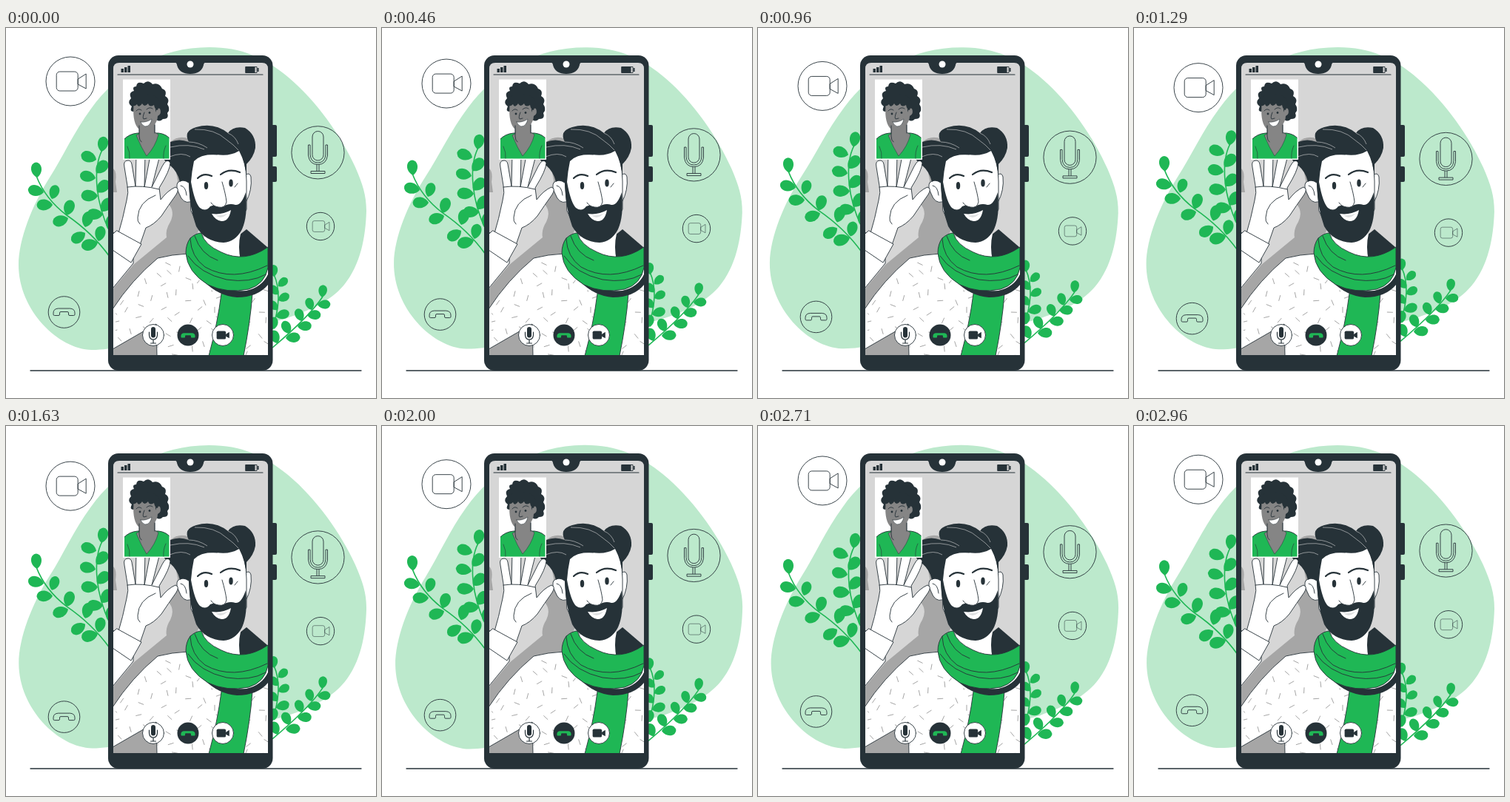
An HTML page that plays this animation: 500x500 px, repeating every 3 s.

```html
<!DOCTYPE html>
<html lang="en">
<head>
<meta charset="utf-8">
<title>Video call</title>
<style>
html, body { margin: 0; height: 100%; overflow: hidden; background: #fff; }
svg { display: block; width: 100vw; height: 100vh; }
.d { fill: #263238; }
.g { fill: #1fb755; }
.w { fill: #fff; }
.s { fill: #a6a6a6; }
.n { fill: none; }
.l { stroke: #263238; stroke-width: .9; stroke-linejoin: round; stroke-linecap: round; }
.icon * { fill: none; stroke: #263238; stroke-width: .9; vector-effect: non-scaling-stroke; }
.stem { fill: none; stroke: #1fb755; stroke-width: 1.6; }
</style>
</head>
<body>
<svg viewBox="0 0 500 500">
<defs>
  <path id="leaf" d="M0 0C-7-4-9-13-5-18Q0-23 5-18C9-13 7-4 0 0Z"/>
  <g id="cam"><rect x="-19" y="-13" width="29" height="26" rx="4.5"/><path d="M10-3 21-10V10L10 4Z"/></g>
  <path id="handset" d="M-14.5 1Q-14.5-4.5-8-5H8Q14.5-4.5 14.5 1V3Q14.5 4.5 13 4.5H7.5Q6 4.5 6 3V1Q6-.5 4.5-.5H-4.5Q-6-.5-6 1V3Q-6 4.5-7.5 4.5H-13Q-14.5 4.5-14.5 3Z"/>
  <clipPath id="screen"><path d="M153 47H346Q354 47 354 55V442H145V55Q145 47 153 47Z"/></clipPath>
  <clipPath id="shirt"><path d="M148 378Q172 342 207 314L246 308Q250 342 292 362L274 442H205L203 397 148 428ZM333 364 354 348V442H321Z"/></clipPath>
  <clipPath id="inset"><path d="M160 71H220.500V176.500H160Z"/></clipPath>
</defs>

<path id="blob" fill="#bce9cc" d="M275 26C318 26 350 40 382 67C420 99 453 146 472 188C482 211 487 226 487 247C486 283 479 320 457 347C437 371 408 382 380 392C310 414 245 385 200 410C168 427 146 435 116 435C70 434 17 381 17 320C17 286 35 240 59 202C77 174 92 140 115 109C151 59 207 26 275 26Z"/>

<g id="plants">
  <path class="stem" d="M41 200Q53 231 82 253Q117 277 140 309M130 165C117 190 121 236 140 275M428 363Q410 390 360 432M362 333Q375 362 360 407"/>
</g>

<path class="l" style="stroke-width:1.300" d="M33 463H480"/>
<rect class="d" x="355" y="131" width="11" height="43" rx="2"/>
<rect class="d" x="355" y="187" width="11" height="21" rx="2"/>
<rect class="d" x="138" y="37" width="222.500" height="426" rx="14"/>

<g clip-path="url(#screen)">
  <path fill="#d6d6d6" d="M145 47H354V442H145Z"/>
  <path class="s" d="M222 154Q234 144 248 150L262 270 246 304 205 311 145 380V352L172 320 217 283Q215 273 222 262 229 248 219 237 232 222 232 206ZM145 190Q150 194 148 208L150 222H145ZM145 442V430L204 398V442Z"/>

  <path class="w l" d="M144 380Q170 340 205 311Q224 306 246 305L355 297V443H204L203 400 144 434Z"/>
  <g clip-path="url(#shirt)"><path id="dashes" class="n" stroke="#9a9a9a" stroke-width=".9"/></g>

  <path class="d" d="M310 284 325 272 353 296 346 309 316 314Z"/>
  <path class="w" d="M267 282Q271 297 283 302L317 314Q313 295 317 278Z"/>
  <path class="g l" d="M291 359Q286 399 274 443H321Q330 399 333 359Z"/>
  <path class="d" d="M268 343Q290 357 325 355Q346 350 354 333V347Q340 364 312 364Q287 362 268 343Z"/>
  <path class="g l" d="M249 284Q257 277 264 277Q268 293 291 303Q322 318 354 296V324Q350 346 328 353Q298 359 273 347Q245 330 243 304Q243 292 249 284Z"/>
  <path class="n l" d="M249 285Q250 309 269 323Q306 344 353 321M255 281Q263 306 286 314M246 308Q262 332 298 340Q330 345 351 333"/>

  <path class="w l" d="M247 209Q238 203 232 209Q229 214 234 224Q239 238 249 235ZM323 199Q329 194 331 201Q333 219 324 236Z"/>
  <path class="n l" d="M236 213Q243 214 244 226"/>
  <path class="w l" d="M249 180Q259 168 285 171L314 162Q325 179 325 207V245L309 274H263L250 247Z"/>
  <path class="d" d="M222 154Q234 149 247 154Q239 139 257 134Q281 127 300 142Q307 132 323 135Q338 144 337 162Q335 174 325 184L325 203Q324 183 315 166Q302 174 284 171Q263 170 254 180Q251 194 250 208Q255 236 262 243Q270 249 276 241Q285 237 292 242Q301 236 310 239Q318 240 324 222Q327 254 319 272Q310 289 294 290Q269 289 257 268Q248 244 247 209Q240 204 235 208Q232 194 221 185Q213 179 212 174Q218 166 222 154Z"/>
  <path class="n" stroke="#d6d6d6" stroke-width=".6" d="M222 161Q247 155 268 164M247 154Q260 154 272 162M255 137Q282 136 298 151 308 158 314 165M300 142Q310 146 314 157M221 174Q238 167 249 174"/>
  <path class="w l" d="M292 208Q297 225 298 235Q296 244 287 242Q280 241 277 236L279 230Z" stroke="none" style="stroke:none"/>
  <path class="n l" d="M292 208Q297 225 298 235Q296 244 287 242Q280 241 277 236"/>
  <path class="w" d="M278 251Q292 253 304 246Q301 262 291 261Q283 260 278 251Z"/>
  <path class="d" d="M283 253Q293 254 300 250Q291 260 283 253Z" opacity=".15"/>
  <ellipse class="d" cx="270.500" cy="213" rx="2.700" ry="5"/>
  <ellipse class="d" cx="304" cy="209.500" rx="2.700" ry="5"/>
  <path class="n l" style="stroke-width:2.200" d="M259 203Q267 195 278 200M290 198Q301 189 316 195"/>
  <path class="n l" d="M309 215 313 210"/>

  <path class="w l" d="M144 275 172 310V318L144 352Z"/>
  <path class="w l" d="M151 281Q158 258 163 233Q166 222 164 213L160 188Q158 179 165 179Q169 179 170 184L175 214 176 170H188L187 215 195 172H208L197 215 211 187Q217 175 222 182Q222 192 207 216L209 232Q219 219 229 215Q235 217 230 225Q220 239 210 254Q200 266 189 270L180 296Z"/>
  <path class="n l" d="M164 215Q184 212 207 218M202 226Q179 235 178 256Q177 261 181 265"/>
  <path class="w l" d="M150 274 183 292 169 317 144 300V279Z"/>

  <path class="w" d="M158 69.500H222V178H158Z"/>
  <g clip-path="url(#inset)">
    <path class="g l" d="M159 151Q166 143 178 142H206Q216 143 222 150V178H159Z"/>
    <path class="d" d="M176 79Q177 71 186 75Q192 69 198 76Q207 73 211 82Q218 84 215 92Q222 96 218 103Q223 110 218 115Q221 123 212 123Q206 129 201 121L174 113Q166 114 170 106Q163 101 169 95Q165 87 173 85Q170 79 176 79Z"/>
    <path fill="#858585" class="l" style="stroke-width:.5" d="M180 131V143L176 145Q183 162 190 173Q202 160 206 144L201 141V124Z"/>
    <path fill="#858585" d="M173 100Q170 125 178 135Q188 144 197 135Q205 127 205 119Q211 116 208 109Q204 107 202 114L202 96Z"/>
    <path class="d" d="M169 99Q173 88 187 91Q201 86 208 100L205 111Q201 110 200 104Q194 108 192 102Q187 108 184 102Q179 109 177 103Q171 109 169 99Z"/>
    <path class="n l" d="M176 112Q179 108 183 111M190 110Q194 106 198 109M187 114Q184 121 186 123L190 122M180 132V146Q180 152 183 154M201 131V142"/>
    <circle class="d" cx="181" cy="116" r="1.400"/><circle class="d" cx="194" cy="114.500" r="1.400"/>
    <path class="w l" style="stroke-width:.5" d="M182 127Q190 128 197 123Q195 133 188 133Q184 132 182 127Z"/>
    <path class="n l" style="stroke-width:.6" d="M167 177Q168 168 164 160M213 177Q212 167 216 159"/>
  </g>

  <circle class="w l" cx="199" cy="415" r="14.500"/>
  <rect class="d" x="196" y="404" width="6" height="14.500" rx="3"/>
  <path class="n l" style="stroke-width:1.200" d="M193.500 411V415Q194 421 199 421Q204 421 204.500 415V411M199 421V426M195.500 426H202.500"/>
  <circle class="d" cx="246" cy="415" r="14.500"/>
  <use href="#handset" class="g" transform="translate(246 415.500) scale(.66)"/>
  <circle class="w l" cx="293" cy="415" r="14.500"/>
  <use href="#cam" class="d" transform="translate(292.800 415) scale(.43)"/>
</g>

<path class="n l" style="stroke-width:1.100" d="M151 63H347"/>
<path class="d" d="M225 46Q231 46 231 50Q234 62 249 62Q264 62 267 50Q267 46 273 46Z"/>
<circle class="w" cx="249" cy="49" r="4.500"/>
<path class="d" d="M155.500 55H159V60H155.500ZM160 53H163.500V60H160ZM164.500 51H168V60H164.500ZM339.500 54H341.500V59H339.500Z"/>
<rect class="n l" x="324" y="52.500" width="15" height="8"/>
<path class="d" d="M324 52H336.500V61H324Z"/>

<g id="icons" class="icon">
  <circle cx="87" cy="72" r="33"/>
  <use href="#cam" transform="translate(87.200 72)"/>
  <circle cx="425" cy="268" r="18.700"/>
  <use href="#cam" transform="translate(425 268) scale(.57)"/>
  <circle cx="78.500" cy="384" r="21.300"/>
  <use href="#handset" transform="translate(78.500 384)"/>
  <circle cx="421.500" cy="168.300" r="35.600"/>
  <rect x="414" y="139.500" width="15" height="39.500" rx="7.500"/>
  <path d="M408.500 158H411V171Q412 182 421.500 182Q431 182 432 171V158H434.500V172Q433 184.500 421.500 184.500Q410 184.500 408.500 172ZM420 184.500V193.500M423 184.500V193.500M412 193.500H431V196.500H412Z"/>
</g>
</svg>
<script>
const el = id => document.getElementById(id);

// x, y of the stalk, angle, size
const leftLeaves = [
  [42, 202, -5, 1], [51, 222, -78, 1.05], [62, 231, 18, .95], [63, 239, -90, 1.05],
  [82, 253, 17, 1.03], [84, 257, -108, 1.05], [107, 269, 16, 1.05], [107, 277, -122, 1.05],
  [125, 288, 12, 1], [124, 290, -104, 1.1],
  [129, 167, 10, 1], [122, 178, -70, 1.05], [122, 196, 42, 1.05], [121, 203, -77, 1.05],
  [123, 222, 46, 1.05], [124, 227, -88, 1.1], [129, 248, 37, 1.05], [131, 252, -88, 1.05],
  [138, 272, 20, 1]
];
const rightLeaves = [
  [427, 364, 7, .82], [421, 374, 87, .85], [413, 381, -17, .82], [407, 388, 88, .9],
  [400, 396, -22, .86], [394, 403, 88, .92], [383, 413, -25, .9], [378, 419, 86, .95],
  [367, 426, -22, .9],
  [362, 336, -2, .78], [368, 349, 48, .78], [368, 360, -43, .75], [368, 368, 62, .8],
  [367, 381, -42, .75], [365, 390, 72, .9], [362, 407, 0, .8]
];
el("plants").innerHTML += [...leftLeaves, ...rightLeaves].map(([x, y, a, s]) =>
  `<use href="#leaf" class="g" transform="translate(${x} ${y}) rotate(${a}) scale(${s})"/>`).join("");

// Scattered strokes of the shirt fabric
let marks = "";
for (let row = 0; row < 9; row++) {
  for (let col = 0; col < 10; col++) {
    const n = row * 10 + col;
    const x = 146 + col * 22 + row % 2 * 11 + 4 * Math.sin(n * 7);
    const y = 320 + row * 15 + 4 * Math.cos(n * 5);
    const a = n * 2.2 + Math.sin(n);
    marks += `M${x} ${y}l${8 * Math.cos(a)} ${8 * Math.sin(a)}`;
  }
}
el("dashes").setAttribute("d", marks);

const move = (id, transform) => el(id).setAttribute("transform", transform);

function draw(now) {
  const p = now % 3000 / 3000;
  const rise = 10 * (1 - Math.abs(1 - 2 * p));
  const turn = p < .25 ? 4 * p : p < .75 ? 2 - 4 * p : 4 * p - 4;
  move("icons", `translate(0 ${rise})`);
  move("plants", `translate(0 ${-rise})`);
  move("blob", `rotate(${turn} 252 230)`);
  requestAnimationFrame(draw);
}
draw(performance.now());
</script>
</body>
</html>
```
